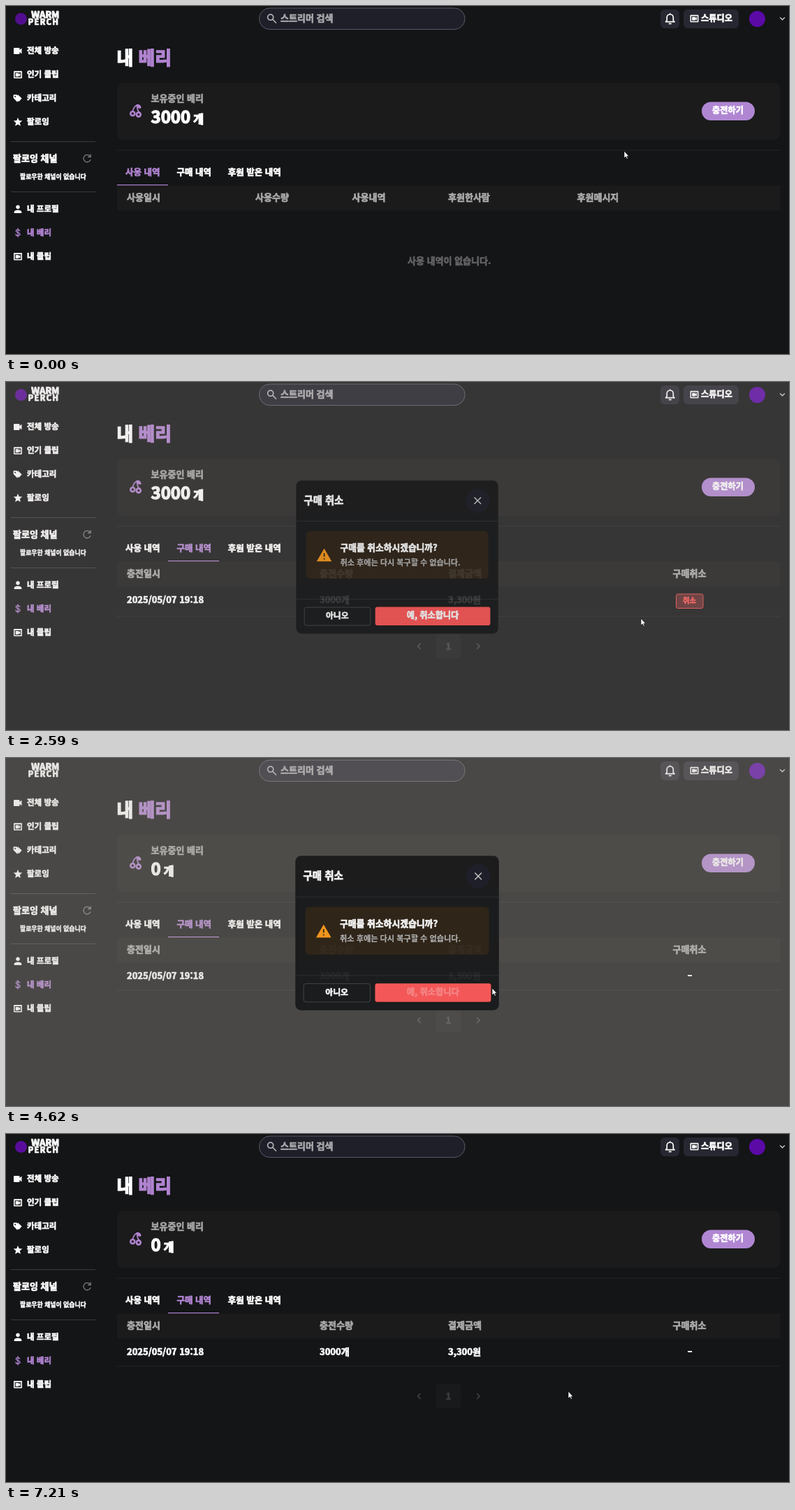
An HTML page for the animation above (7530 ms loop, 1121 by 499 pixels).

```html
<!DOCTYPE html>
<html lang="ko">
<head>
<meta charset="utf-8">
<style>
  html, body { margin: 0; width: 100%; height: 100%; overflow: hidden; background: #141517; }
  svg { display: block; }
  /* the stroke thickens the heaviest installed Korean weight */
  text {
    font: 900 13px "Noto Sans CJK KR", "Noto Sans CJK JP", "Noto Sans CJK", sans-serif;
    color: #fff; fill: currentColor; stroke: currentColor; stroke-width: .055em; white-space: pre;
  }
  .menu text { font-size: 11.5px; }
  .tabs text { font-size: 12.5px; }
  .head text { color: #a9a9a9; }
  .logo text { font: 900 10.5px Inter, sans-serif; stroke: none; }
  .line { fill: none; stroke-linecap: round; stroke-linejoin: round; }
</style>
</head>
<body>
<svg width="1121" height="499" viewBox="0 0 1121 499">
  <defs>
    <path id="clip" fill-rule="evenodd" d="M1 0H11Q12 0 12 1V9.500Q12 10.500 11 10.500H1Q0 10.500 0 9.500V1Q0 0 1 0ZM1.500 1.900V9H10.500V1.900ZM2.700 3H7.200V4.600L9.500 2.900V8L7.200 6.300V7.900H2.700Z"/>
    <g id="name"><text x="36" y="17">WARM</text><text x="31.500" y="26.500" style="font-size:11px;letter-spacing:1.500px">PERCH</text></g>
  </defs>
  <rect width="1121" height="499" fill="#141517"/>

  <g class="logo">
    <circle id="mark" cx="21.500" cy="18.500" r="8.500" fill="#5a0d9c"/>
    <g style="--c:#48d5e8" transform="translate(.7 .5)" opacity=".6"><use href="#name"/></g>
    <use href="#name"/>
  </g>

  <!-- top bar -->
  <rect x="362.500" y="3" width="294.500" height="30.500" rx="15.200" fill="#1f1f29" stroke="#5a5a66"/>
  <g class="line" stroke="#b4b4b8" stroke-width="1.700"><circle cx="378.700" cy="16.200" r="4"/><path d="M382 19.500L386.500 24"/></g>
  <text x="393" y="22.300" style="color:#a6a6aa">스트리머 검색</text>
  <rect x="937" y="5" width="27" height="27" rx="6" fill="#272731"/>
  <path class="line" d="M944.500 22.700H957L955.300 20.700V16.500C955.300 10.500 946.200 10.500 946.200 16.500V20.700ZM950.700 11.500V11M949.500 25.300H952" stroke="#fff" stroke-width="1.700"/>
  <rect x="970" y="5" width="79" height="27" rx="6" fill="#272731"/>
  <use href="#clip" x="979.500" y="12.700" fill="#fff"/>
  <text x="995" y="22" style="font-size:12.200px">스튜디오</text>
  <circle cx="1075.500" cy="18.500" r="11.500" fill="#5b0aa6"/>
  <path class="line" d="M1108.500 16.800L1111.500 19.700L1114.500 16.800" stroke="#ccc" stroke-width="1.400"/>

  <!-- side menu -->
  <g class="menu" fill="#fff">
    <path d="M12 60H18.500Q19.500 60 19.500 61V63L22.500 60.500V68.500L19.500 66V68Q19.500 69 18.500 69H12Q11 69 11 68V61Q11 60 12 60Z"/>
    <text x="30" y="68.300">전체 방송</text>
    <use href="#clip" x="11" y="93.300"/>
    <text x="30" y="102.300">인기 클립</text>
    <path d="M11 127.500H15.500L20.500 132.500L16 137.200L11 132ZM17 127.500L22.200 132.500L18 137.200" stroke="#fff" stroke-width=".8"/>
    <circle cx="13.200" cy="129.700" r="1" fill="#141517"/>
    <text x="30" y="136.300">카테고리</text>
    <path d="M17 160L18.700 164.200L23.300 164.600L19.800 167.600L20.900 172L17 169.700L13.100 172L14.200 167.600L10.700 164.600L15.300 164.200Z"/>
    <text x="30" y="170">팔로잉</text>
    <path d="M7 194.500H128M7 266.500H128" stroke="#3b3b3e"/>
    <text x="10" y="222.700" style="font-size:13px">팔로잉 채널</text>
    <path class="line" d="M120.700 216A5.200 5.200 0 1 0 120.900 220.800M121.200 213V216.500H117.700" stroke="#77777b" stroke-width="1.400"/>
    <text x="20" y="247.800" style="font-size:8.900px">팔로우한 채널이 없습니다</text>
    <circle cx="17" cy="288.300" r="2.700"/>
    <path d="M11.700 297V295.300C12 291.500 22 291.500 22.300 295.300V297Z"/>
    <text x="30" y="295">내 프로필</text>
    <path class="line" d="M19.700 322.300C19 320 14.300 320 14.300 322.700C14.300 325.500 20 324.200 20 327.300C20 330 14.500 330 14 327.500M17 319V331" stroke="#b083d0" stroke-width="1.300"/>
    <text x="30" y="329" style="color:#b083d0">내 베리</text>
    <use href="#clip" x="11" y="354"/>
    <text x="30" y="362.700">내 클립</text>
  </g>

  <!-- balance -->
  <text x="158.500" y="83.700" style="font-size:25.800px">내 <tspan style="color:#b083d0;fill:#b083d0;stroke:#b083d0">베리</tspan></text>
  <rect x="159" y="110" width="949.500" height="82" rx="9" fill="#1b1b1b"/>
  <g class="line" stroke="#b083d0" stroke-width="1.600">
    <path d="M181.500 151C182 147 184 144 187.500 142C187.500 146 188 149 190 152"/>
    <path d="M187.500 142C190 141 192.500 143 192.800 146C190 146.500 188 145 187.500 142Z" fill="#b083d0"/>
    <circle cx="181.300" cy="154.300" r="3" stroke-width="2.600"/><circle cx="189.800" cy="155.600" r="3" stroke-width="2.600"/>
  </g>
  <text x="207.500" y="136.800" style="color:#a3a3a3">보유중인 베리</text>
  <text x="207.500" y="168" style="font-size:24px"><tspan id="amount">3000</tspan><tspan dx="4" dy="-.500" style="font-size:16px">개</tspan></text>
  <rect x="996" y="137.500" width="76" height="26.500" rx="13.200" fill="#b086d3"/>
  <text x="1011" y="154.200" style="font-size:12.200px">충전하기</text>
  <path d="M159 207H1108.500" stroke="#232426"/>

  <!-- tables -->
  <g class="tabs">
    <text id="tab1" x="171" y="243">사용 내역</text>
    <text id="tab2" x="244.500" y="243">구매 내역</text>
    <text id="tab3" x="317.700" y="243">후원 받은 내역</text>
  </g>
  <rect x="159" y="257.500" width="949.500" height="35.500" fill="#1b1b1b"/>
  <rect id="underline" x="159" y="256" width="73" height="1.200" fill="#b083d0"/>
  <g id="used" class="head">
    <text x="173" y="278.500">사용일시</text><text x="357" y="278.500">사용수량</text><text x="495.500" y="278.500">사용내역</text>
    <text x="633" y="278.500">후원한사람</text><text x="817.500" y="278.500">후원메시지</text>
    <text x="575" y="370" style="color:#626264">사용 내역이 없습니다.</text>
  </g>
  <g id="bought">
    <g class="head">
      <text x="173" y="278.500">충전일시</text><text x="449" y="278.500">충전수량</text>
      <text x="633" y="278.500">결제금액</text><text x="954.500" y="278.500">구매취소</text>
    </g>
    <text x="173" y="316.500">2025/05/07 19:18</text><text x="449" y="316.500">3000개</text><text x="633" y="316.500">3,300원</text>
    <g id="cancel">
      <rect id="cancelFill" x="959.500" y="304" width="38.500" height="20.500" rx="2.500" fill="#ff5555"/>
      <rect x="959.500" y="304" width="38.500" height="20.500" rx="2.500" fill="none" stroke="#e24c4c"/>
      <text x="969" y="317" style="font-size:10.300px;color:#ff5555">취소</text>
    </g>
    <rect id="dash" x="976" y="311" width="6" height="2" fill="#fff"/>
    <g id="pager">
      <path d="M159 336H1108.500" stroke="#232426"/>
      <rect x="616" y="361.500" width="35" height="35" rx="4" fill="#191a1c"/>
      <text x="629.500" y="383.500" style="color:#3d3d42">1</text>
      <path class="line" d="M593 375.500L589.500 379L593 382.500M674.500 375.500L678 379L674.500 382.500" stroke="#4b4b50" stroke-width="1.300"/>
    </g>
    <rect id="caret" x="173" y="268" width="1" height="14" fill="#aaa"/>
  </g>

  <!-- dialog -->
  <rect id="backdrop" width="1121" height="499" fill="#bbb4ac"/>
  <g id="dialog">
    <rect x="412.500" y="139" width="295" height="224" rx="8" fill="#191a1b"/>
    <text x="424" y="173.300" style="font-size:14.600px">구매 취소</text>
    <circle cx="677.500" cy="168.500" r="17.500" fill="#1d1d28"/>
    <path class="line" d="M673 164L682 173M682 164L673 173" stroke="#ccc" stroke-width="1.500"/>
    <path d="M412.500 198.500H707.500M412.500 312.500H707.500" stroke="#2d2e30"/>
    <rect x="427" y="213" width="266" height="69.500" rx="6" fill="#2e2317"/>
    <path d="M453.500 238.500L464.500 257.500H442.500Z" fill="#fb9a1c"/>
    <path d="M453.500 245.500V250.500M453.500 252.800V254.600" stroke="#2e2317" stroke-width="1.800"/>
    <text x="477" y="241.500">구매를 취소하시겠습니까?</text>
    <text x="477" y="263" style="font-size:11.300px;color:#b4b4b4;stroke-width:.02em">취소 후에는 다시 복구할 수 없습니다.</text>
    <rect x="424.500" y="324.500" width="96.500" height="26.500" rx="3" fill="#191a1b" stroke="#45464a"/>
    <text x="456" y="341" style="font-size:12px">아니오</text>
    <rect id="confirm" x="528" y="324" width="168" height="27" rx="3"/>
    <text id="confirmText" x="574" y="341" style="font-size:12.400px">예, 취소합니다</text>
    <g id="spinner" class="line" stroke="#fff" stroke-width="1.500">
      <circle cx="612" cy="337.500" r="7" opacity=".18"/>
      <path d="M610 330.800A7 7 0 0 1 615 331.200"/>
    </g>
  </g>

  <g id="cursor" fill="#fff" stroke="#000" stroke-width=".6" stroke-linejoin="round">
    <path id="arrow" d="M0 0V10L2.300 7.900L3.900 11.300L5.400 10.600L3.900 7.400H6.800Z"/>
    <path id="hand" d="M-1 1Q0 -.500 1 1V5Q2 4.300 2.700 5.300Q3.800 4.800 4.300 5.800Q5.800 5.300 6 7V10L4.800 13.500H-1L-4.200 8.700Q-4 7 -2.500 7.800L-1 9Z"/>
  </g>
</svg>
<script>
const LOOP = 7530;
const PURPLE = [176, 131, 208], WHITE = [255, 255, 255];
const RED = [255, 88, 88], PINK = [255, 118, 118];

// [time, x, y] of the pointer
const PATH = [
  [110, 885, 208], [830, 395, 235], [1100, 271, 236], [1330, 271, 236],
  [1980, 998, 320], [2110, 995, 317], [2350, 995, 317], [2590, 909, 339],
  [2920, 690, 335], [3140, 660, 329], [3830, 660, 329], [4220, 696, 330],
  [5080, 696, 330], [5560, 240, 160], [5800, 225, 150], [5900, 250, 132],
  [6250, 944, 318], [6470, 805, 369]
];
// [time, opacity] of the logo mark
const MARK = [[0, .9], [170, 1], [2040, 1], [2190, 0], [2330, 0], [2600, 1], [4480, 1], [4600, 0], [4900, 0], [5150, 1]];

const el = {};
document.querySelectorAll('[id]').forEach(e => el[e.id] = e);

const ramp = (t, from, to) => Math.min(1, Math.max(0, (t - from) / (to - from)));
const smooth = p => p * p * (3 - 2 * p);
const mix = (a, b, p) => a + (b - a) * p;
const blend = (a, b, p) => `rgb(${a.map((v, i) => mix(v, b[i], p))})`;
const within = (t, from, to) => t >= from && t < to;
const fade = (e, v) => e.setAttribute('opacity', v);
const move = (e, v) => e.setAttribute('transform', v);

function follow(keys, t, ease = p => p) {
  const i = keys.findIndex(k => k[0] > t);
  if (i === 0) return keys[0].slice(1);
  if (i < 0) return keys[keys.length - 1].slice(1);
  const a = keys[i - 1], b = keys[i];
  const p = ease(ramp(t, a[0], b[0]));
  return a.slice(1).map((v, j) => mix(v, b[j + 1], p));
}

function draw(t) {
  const bought = t >= 1300, refunded = t >= 4570;
  fade(el.mark, follow(MARK, t)[0]);

  // page content
  fade(el.used, bought ? 0 : 1);
  fade(el.bought, bought ? 1 : 0);
  el.underline.setAttribute('x', bought ? 232 : 159);
  el.tab1.style.color = blend(WHITE, PURPLE, bought ? 0 : 1);
  el.tab2.style.color = blend(WHITE, PURPLE, ramp(t, 960, 1100));
  el.tab3.style.color = blend(WHITE, PURPLE, ramp(t, 800, 880) - ramp(t, 940, 1060));
  el.amount.textContent = refunded ? '0' : '3000';
  fade(el.cancel, refunded ? 0 : 1);
  fade(el.cancelFill, .3 * (ramp(t, 2110, 2260) - ramp(t, 2750, 2980)));
  fade(el.dash, refunded ? 1 : 0);
  move(el.pager, `translate(0 ${refunded ? -3 : 0})`);
  fade(el.caret, t > 4650 && Math.floor((t - 4510) / 540) % 2 === 0 ? 1 : 0);

  // dialog
  const closing = t > 4000;
  const open = closing ? 1 - ramp(t, 4590, 4720) : ramp(t, 2450, 2680);
  const shown = 1 - (1 - open) ** 2;
  fade(el.backdrop, .34 * (closing ? shown : open));
  fade(el.dialog, shown);
  move(el.dialog, `translate(560 251) scale(${.95 + .05 * open}) translate(-560 -251)`);
  const loading = within(t, 3530, 4550);
  el.confirm.style.fill = blend(RED, PINK, ramp(t, 2920, 3100) - ramp(t, 4500, 4620));
  fade(el.confirmText, loading ? 0 : t < 3530 ? 1 : ramp(t, 4550, 4800));
  fade(el.spinner, loading ? 1 : 0);
  move(el.spinner, `rotate(${(t - 3810) * .45} 612 337.5)`);

  // pointer
  const hand = within(t, 840, 1400) || within(t, 1900, 2460) || within(t, 2960, 3530);
  move(el.cursor, `translate(${follow(PATH, t, smooth)})`);
  fade(el.arrow, hand ? 0 : 1);
  fade(el.hand, hand ? 1 : 0);
}

function frame() {
  draw(performance.now() % LOOP);
  requestAnimationFrame(frame);
}
frame();
</script>
</body>
</html>
```
